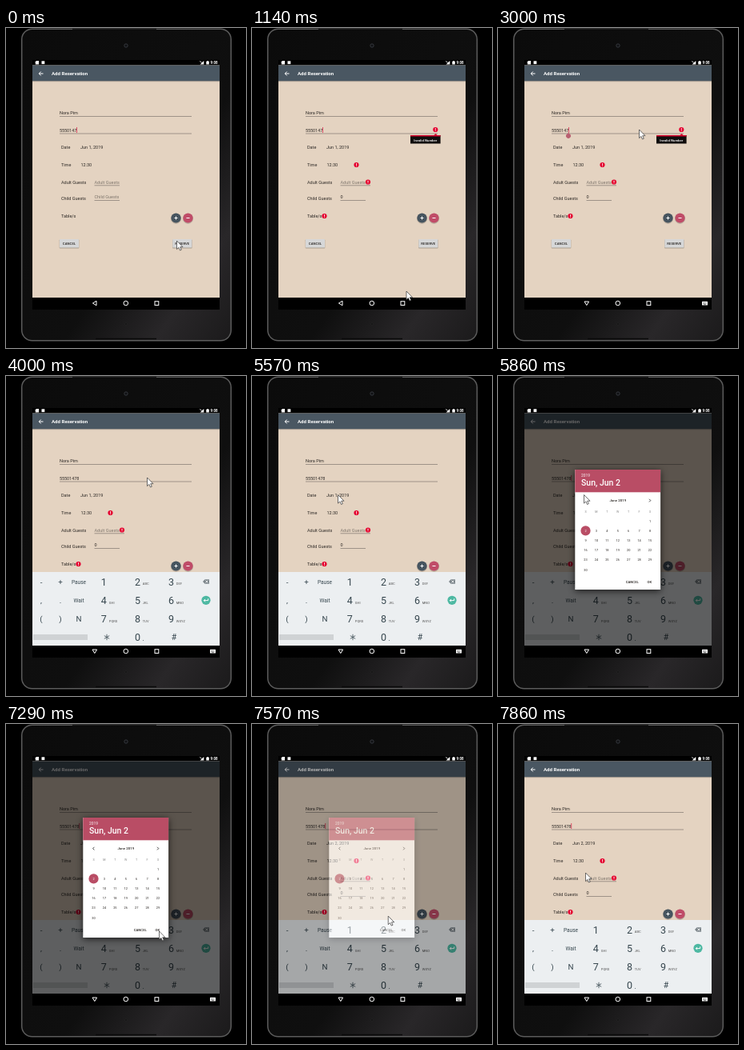
Recreate the animation shown at these times as an HTML page. Size 300x400 px, loop 8000 ms.

```html
<!DOCTYPE html>
<html lang="en">
<head>
<meta charset="utf-8">
<title>Add Reservation</title>
<style>
html, body { margin: 0; width: 100%; height: 100%; overflow: hidden; background: #000; }
svg { display: block; width: 100vw; height: 100vh; }
text { font: 5.5px Roboto, sans-serif; fill: #2b2724; white-space: pre; }
.mid { text-anchor: middle; }
.bold { font-weight: 500; }
.btn { font-size: 4.3px; font-weight: 500; text-anchor: middle; }
.hint { fill: #7d746b; }
.line { stroke: #978c82; stroke-width: .9; }
.white { fill: #fff; }
.outline { fill: none; stroke: #fff; stroke-width: 1; }
.sheet { filter: drop-shadow(0 2px 4px rgba(0, 0, 0, .7)); }
</style>
</head>
<body>
<svg viewBox="0 0 300 400">
  <defs>
    <linearGradient id="shell" x1="0" y1="0" x2="1" y2="1">
      <stop offset="0" stop-color="#0b0b0b"/>
      <stop offset=".6" stop-color="#0f0f0f"/>
      <stop offset=".82" stop-color="#292729"/>
      <stop offset="1" stop-color="#1b1a1b"/>
    </linearGradient>
    <clipPath id="screen"><rect x="33" y="40" width="234" height="297"/></clipPath>
    <g id="alert">
      <circle r="3.1" fill="#e4002f"/>
      <path d="M0-1.8V.5M0 1.1V1.9" stroke="#fff" stroke-width=".9"/>
    </g>
  </defs>

  <!-- Tablet -->
  <rect x="19.7" y="1.2" width="261.6" height="389.6" rx="13" fill="url(#shell)" stroke="#5c5c5c" stroke-width="1.5"/>
  <path d="M83 2H188M112 388.5H188" stroke="#0a0a0a" stroke-width="1.6"/>
  <circle cx="150" cy="22" r="2.2" fill="#101114" stroke="#464a50" stroke-width=".7"/>
  <circle cx="150" cy="370" r="1.2" fill="#0b0b0b" stroke="#3a3a3a" stroke-width=".4"/>
  <rect x="33" y="40" width="234" height="312" fill="#000"/>

  <g clip-path="url(#screen)">
    <rect x="33" y="46.5" width="234" height="291" fill="#e4d3c1"/>
    <rect x="33" y="66" width="234" height="1.2" fill="#b5a89b"/>
    <rect x="33" y="46.5" width="234" height="19.7" fill="#4a5762"/>
    <path class="outline" d="M46.5 57H41.3M43.7 54.5L41.2 57L43.7 59.5"/>
    <text class="white" x="57" y="59.2" style="font-size:6.1px;font-weight:700">Add Reservation</text>

    <!-- Status bar -->
    <path class="white" d="M38 41H41V45.5H36.8V42.3Z"/>
    <rect class="white" x="44.5" y="41.3" width="3.8" height="3.8"/>
    <path class="white" d="M247.3 41V45.6H242.6Z"/>
    <path class="outline" d="M242.5 41.3L244.7 43.5"/>
    <path class="white" d="M250.3 41.7H251.4V41H252.8V41.7H253.8V45.6H250.3Z"/>
    <text class="white" x="255.6" y="45" style="font-size:4.5px;font-weight:700">9:08</text>

    <!-- Form -->
    <text x="67" y="108.3">Nora Pim</text>
    <text x="67" y="129.6" id="phone" style="font-size:5.4px"></text>
    <path class="line" d="M67 110.5H232M67 132H232"/>
    <text x="69" y="151">Date</text><text x="93" y="151" id="date"></text>
    <text x="69" y="173">Time</text><text x="93.5" y="173">12:30</text>
    <text x="69" y="195.2">Adult Guests</text><text class="hint" x="110.5" y="194.6">Adult Guests</text>
    <text x="69" y="214.7">Child Guests</text><text x="110.5" y="213.4" id="child"></text>
    <path class="line" id="adultLine"/>
    <path class="line" d="M110.5 215.5H142"/>
    <text x="69" y="237">Table/s</text>
    <g id="fab"></g>
    <g id="buttons"></g>

    <g id="errors">
      <use href="#alert" x="130.5" y="171"/>
      <use href="#alert" x="145" y="192.5"/>
      <use href="#alert" x="90.5" y="235"/>
    </g>
    <g id="invalid">
      <use href="#alert" x="229.3" y="127"/>
      <rect x="198" y="134" width="37.6" height="10.5" fill="#100d0d"/>
      <path d="M198 134H227.5L229.5 132L231.5 134H235.6V135.6H198Z" fill="#d3002c"/>
      <text class="white bold" x="216.8" y="141.6" style="font-size:4.3px;text-anchor:middle">Invalid Number</text>
    </g>
    <path id="caret" stroke="#d8405c" stroke-width=".9"/>
    <path id="handle" d="M88 131L90.3 133A3 3 0 1 1 85.7 133Z" fill="#b85f70"/>

    <g id="keyboard">
      <rect x="33" y="245" width="234" height="92.5" fill="#eceff1"/>
      <rect x="34" y="323" width="68" height="7" fill="#cfd2d4"/>
      <path d="M246 257L248.6 254.2H254V259.8H248.6Z" fill="#7d868b"/>
      <path d="M249.4 255.6L252.4 258.4M252.4 255.6L249.4 258.4" stroke="#fff" stroke-width=".8"/>
      <circle cx="250" cy="280.3" r="5.6" fill="#4db8a2"/>
      <path class="outline" d="M252.7 278.3V280.6H247.3M249 278.9L247.3 280.6L249 282.3"/>
      <path d="M126 322.8V330.2M122.8 324.6L129.2 328.4M129.2 324.6L122.8 328.4" stroke="#37474f" stroke-width=".8"/>
    </g>

    <g id="modal">
      <rect x="33" y="46.5" width="234" height="291" opacity=".6"/>
      <rect class="sheet" x="96.3" y="117" width="106.8" height="150" fill="#fff"/>
      <rect x="96.3" y="117" width="106.8" height="28.3" fill="#b94d65"/>
      <text class="bold" x="104" y="126.4" style="font-size:4.9px;fill:#ecd0d7">2019</text>
      <text class="white bold" x="104" y="137.3" style="font-size:10.5px">Sun, Jun 2</text>
      <path d="M110.4 153.8L108.6 155.6L110.4 157.4M189 153.8L190.8 155.6L189 157.4" fill="none" stroke="#333" stroke-width=".9"/>
      <text class="mid bold" x="149.8" y="157.2" style="font-size:4.4px">June 2019</text>
      <circle cx="109.5" cy="193.4" r="6.1" fill="#b94d65"/>
      <text class="btn" x="167.8" y="259.2">CANCEL</text>
      <text class="btn" x="189.4" y="259.2">OK</text>
    </g>
  </g>

  <!-- Navigation bar -->
  <path class="outline" id="back"/>
  <circle class="outline" cx="149.8" cy="344" r="2.8"/>
  <rect class="outline" x="186" y="341.7" width="4.8" height="4.8"/>
  <g id="imeIcon">
    <rect class="white" x="255" y="341.8" width="7" height="4.8" rx=".5"/>
    <path d="M256 343.2H261M256 344.4H261" stroke="#222" stroke-width=".6" stroke-dasharray=".7 .5"/>
    <path d="M257 345.7H260" stroke="#222" stroke-width=".6"/>
  </g>

  <path id="mouse" d="M0 0V10.6L2.4 8.4L4 12L5.8 11.2L4.2 7.7H7.5Z" fill="#fff" stroke="#333" stroke-width=".7"/>
</svg>
<script>
const $ = id => document.getElementById(id);
const add = (parent, markup) => parent.insertAdjacentHTML('beforeend', markup);
const label = (parent, x, y, str, size, extra = '', cls = 'mid') =>
  add(parent, `<text class="${cls}" x="${x}" y="${y}" style="font-size:${size}px;${extra}">${str}</text>`);

// Round and flat buttons
[[212.5, '#46545f', 'M-2 0H2M0-2V2'], [227.5, '#c04c68', 'M-2 0H2']].forEach(([x, fill, sign]) =>
  add($('fab'), `<g transform="translate(${x} 237.5)"><circle r="6.5" cy=".7" opacity=".2"/>
    <circle r="6.1" fill="${fill}"/><path class="outline" d="${sign}"/></g>`));
[[79, 'CANCEL'], [220.3, 'RESERVE']].forEach(([x, str]) =>
  add($('buttons'), `<rect x="${x - 12.3}" y="264.5" width="24.6" height="11" rx=".8" opacity=".25"/>
    <rect x="${x - 12}" y="264" width="24" height="10.5" rx=".6" fill="#d6d7d8"/>
    <text class="btn" x="${x}" y="270.8">${str}</text>`));

// Phone keyboard
const keyRows = [
  ['-', '+', 'Pause', '1', '', '2', 'ABC', '3', 'DEF'],
  [',', '.', 'Wait', '4', 'GHI', '5', 'JKL', '6', 'MNO'],
  ['(', ')', 'N', '7', 'PQRS', '8', 'TUV', '9', 'WXYZ']
];
const keyX = [44, 68, 91, 122.3, 128.8, 164.5, 170.8, 206.5, 212.8];
const keys = $('keyboard');
const keyInk = 'fill:#37474f';
keyRows.forEach((row, r) => row.forEach((key, i) => {
  const y = 257.2 + 23.2 * r;
  if (i > 2 && i % 2 === 0) label(keys, keyX[i], y + 4.2, key, 4.1, 'fill:#555', '');
  else {
    const size = i > 2 ? 12.5 : key.length > 1 ? 6.6 : 9.8;
    label(keys, keyX[i], y + size * .35, key, size, keyInk);
  }
}));
label(keys, 164.5, 331, '0', 12.5, keyInk);
label(keys, 171.8, 330.6, '.', 9, keyInk);
label(keys, 210, 330.4, '#', 10.5, keyInk);

// Calendar: the first of the month falls on a Saturday
const colX = c => 109.5 + 13.42 * c;
[...'SMTWTFS'].forEach((d, c) => label($('modal'), colX(c), 170.6, d, 3.7, 'fill:#888'));
for (let d = 1; d <= 30; d++) {
  const cell = d + 5;
  label($('modal'), colX(cell % 7), 182.6 + 12.22 * Math.floor(cell / 7), d, 3.9,
    d === 2 ? 'fill:#fff' : '');
}

// Pointer path: step, x, y
const path = [
  [0, 213.5, 266], [1, 213.5, 266], [5, 197, 366], [8, 193, 329], [14, 180, 99],
  [18, 176.5, 127], [30, 176.5, 127], [37, 107.5, 148.5], [44, 107.5, 148.5],
  [51, 191.5, 259], [52, 191.5, 259], [55, 109.5, 186]
];
function pointer(step) {
  const i = Math.max(1, path.findIndex(p => p[0] >= step));
  const [a, b] = [path[i - 1], path[i]];
  const u = (step - a[0]) / (b[0] - a[0]);
  const e = u * u * (3 - 2 * u);
  return [1, 2].map(k => a[k] + (b[k] - a[k]) * e);
}

const show = (id, on) => $(id).setAttribute('opacity', +on);
const caretOff = [11, 12, 13, 17, 28, 32, 33, 34, 35, 39];
const modalFade = { 40: .5, 53: .5 };

function draw(ms) {
  const step = Math.floor((ms % 8000 + 4) * 7 / 1000) % 56;
  const typed = step >= 25;
  const failed = step >= 2;
  const ime = step >= 21;

  $('phone').textContent = typed ? '55501478' : '5550147';
  $('date').textContent = step >= 53 ? 'Jun 2, 2019' : 'Jun 1, 2019';
  $('child').textContent = failed ? '0' : 'Child Guests';
  $('child').setAttribute('class', failed ? '' : 'hint');
  $('adultLine').setAttribute('d', `M110.5 196.8H${failed ? 148 : 142}`);
  $('caret').setAttribute('d', `M${typed ? 91.7 : 88.5} 124V131`);
  $('back').setAttribute('d', ime ? 'M108 342H113.6L110.8 346.6Z' : 'M113 341.2V346.8L108.4 344Z');
  $('keyboard').setAttribute('transform', `translate(0 ${step < 22 ? 93 : step < 23 ? 45 : 0})`);
  show('errors', failed);
  show('invalid', failed && !typed);
  show('caret', !caretOff.includes(step));
  show('handle', step >= 20 && !typed);
  show('imeIcon', ime);
  show('modal', modalFade[step] ?? (step > 40 && step < 53));
  $('mouse').setAttribute('transform', `translate(${pointer(step)})`);
}

const start = performance.now();
(function tick() {
  draw(performance.now() - start);
  requestAnimationFrame(tick);
})();
</script>
</body>
</html>
```
